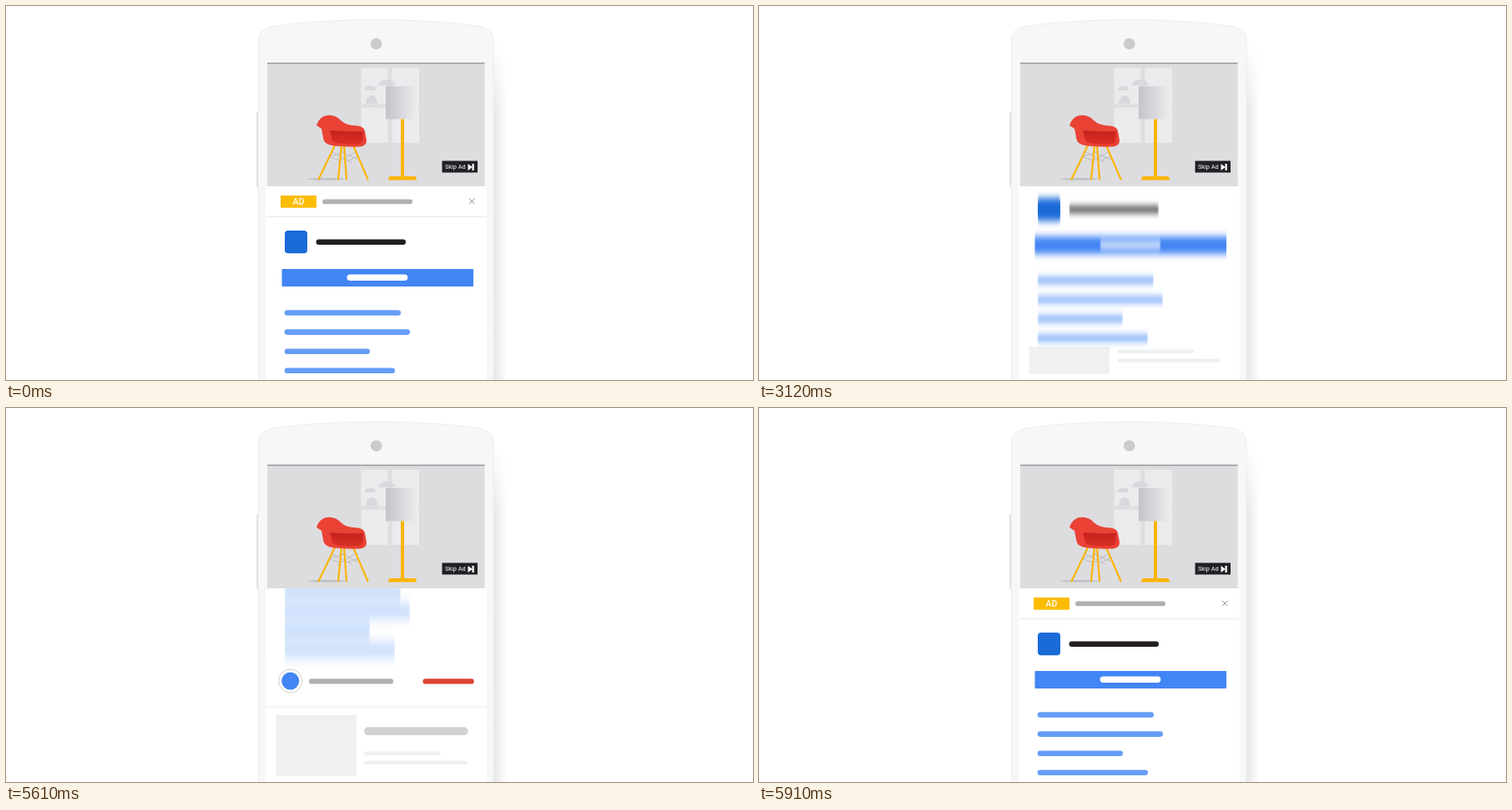
Recreate the animation shown at these times as an HTML page. Size 895 by 448 pixels, loop 6.3 s.

```html
<!DOCTYPE html>
<html lang="en">
<head>
<meta charset="utf-8">
<title>Phone ad panel</title>
<style>
  html, body { margin: 0; width: 100%; height: 100%; overflow: hidden; background: #fff; }
  svg { display: block; width: 100%; height: 100%; }
  text { font-family: Roboto, Arial, sans-serif; fill: #fff; }
  .line { fill: none; stroke-linecap: round; stroke-linejoin: round; }
</style>
</head>
<body>
<svg viewBox="0 0 895 448">
  <defs>
    <linearGradient id="side"><stop stop-color="#e3e4e4"/><stop offset=".5" stop-color="#f1f1f1"/><stop offset="1" stop-color="#fff"/></linearGradient>
    <linearGradient id="sideFade" x2="0" y2="1"><stop stop-color="#fff" stop-opacity="0"/><stop offset=".2" stop-color="#fff"/></linearGradient>
    <mask id="sideMask"><rect x="580" y="44" width="24" height="404" fill="url(#sideFade)"/></mask>
    <linearGradient id="shade"><stop stop-color="#c3c4c9"/><stop offset="1" stop-color="#eeeef0"/></linearGradient>
    <linearGradient id="seat" x2="0" y2="1"><stop stop-color="#c5221f"/><stop offset="1" stop-color="#da3025"/></linearGradient>
    <clipPath id="below"><rect x="311" y="216" width="265" height="232"/></clipPath>
    <filter id="smear" filterUnits="userSpaceOnUse" x="311" y="180" width="265" height="300" color-interpolation-filters="sRGB">
      <feGaussianBlur id="blur" stdDeviation="0 0"/>
    </filter>
  </defs>

  <!-- phone -->
  <rect x="582" y="44" width="18" height="404" fill="url(#side)" mask="url(#sideMask)"/>
  <rect x="300" y="127" width="4" height="90" rx="1" fill="#e3e5e5"/>
  <path d="M302.5 450V40Q303 28 319 24.500Q372 16.500 443.500 16.500T568 24.500Q583.500 28 584 40V450Z" fill="#f6f8f8" stroke="#eceeee"/>
  <circle cx="443.700" cy="45.300" r="6.800" fill="#c9cbcc"/>
  <rect x="311.500" y="216" width="264.500" height="232" fill="#fff"/>

  <!-- video -->
  <rect x="313" y="68" width="260.500" height="148" fill="#dddde0"/>
  <rect x="313" y="67.800" width="260.500" height="1.500" fill="#96979a"/>
  <rect x="425.500" y="74" width="69.500" height="90" fill="#ebebed"/>
  <path d="M457.500 74h5v90h-5zM425.500 117.500h69.500v4h-69.500z" fill="#dedee1"/>
  <path d="M430 101a5 5 0 0 1 7-5q6-1 6 5zM446 95a11 10 0 0 1 21 0zM431 117a7 10 0 0 1 14 0z" fill="#d9d9dd"/>
  <rect x="455" y="96" width="39" height="39.500" fill="url(#shade)"/>
  <path d="M473 135.500h4v68.500h12q3 0 3 4.500h-34q0-4.500 3-4.500h12z" fill="#fbb505"/>
  <ellipse cx="384" cy="207.300" rx="23" ry="1.200" fill="#bdbec2"/>
  <path class="line" d="M391 175L414 187M389 180L407 174M398 187L418 175M401 174L421 184M388 181L400 185M410 185L421 180" stroke="#bbbcc1"/>
  <path class="line" d="M394 167L374.500 207.500M402 167L398 207.500M405 167L408 207.500M416 167L433.500 207.500" stroke="#fbb505" stroke-width="2.200"/>
  <path d="M372 143Q376 131 387 130.800Q396 131 401 137Q407 143 421 143.500Q429 144.500 430 150L432 161Q432 168 424 168.500Q406 169 393 167.500Q382 166 380.500 160L378 147Z" fill="#ea4335"/>
  <path d="M388 149Q407 151 428 150L427.500 160Q427 165 421 165.500Q407 166 397 164.500Q391 163 390.500 159Z" fill="url(#seat)"/>
  <rect x="522.500" y="185.500" width="42.500" height="14" fill="#202124"/>
  <text x="526" y="195.200" font-size="7.300">Skip Ad</text>
  <path d="M553.500 189l5 3.800v-3.800h2.200v8h-2.200v-3.800l-5 3.800z" fill="#fff"/>

  <!-- collapsed ad and page below it -->
  <g id="page"></g>
  <path id="chevrons" class="line" d="M-3 -2.400L0 -5.200L3 -2.400M-3 2.400L0 5.200L3 2.400"/>

  <!-- expanded ad, slides up under the video -->
  <g clip-path="url(#below)">
    <g id="sheet">
      <rect x="311.500" y="214" width="264.500" height="233" fill="#fff"/>
    </g>
    <g id="smeared">
      <g id="content">
        <path id="cross" class="line" d="M-3 -3L3 3M3 -3L-3 3"/>
      </g>
    </g>
  </g>
</svg>
<script>
const LOOP = 6300, STEP = 30, TRAVEL = 232;
const $ = id => document.getElementById(id);
const BLUE = '#4285f4', GREY = '#b1b1b1', YELLOW = '#fbbc04', ICON = '#1a6ad8';

function add(parent, tag, attrs, text = '') {
  const node = document.createElementNS('http://www.w3.org/2000/svg', tag);
  for (const key in attrs) node.setAttribute(key, attrs[key]);
  node.textContent = text;
  parent.append(node);
}
const box = (parent, x, y, right, bottom, fill, rx = 0) =>
  add(parent, 'rect', { x, y, width: right - x, height: bottom - y, rx, fill });
const bar = (parent, x, y, right, bottom, fill) =>
  box(parent, x, y, right, bottom, fill, (bottom - y) / 2);
const divider = (parent, y) => box(parent, 312, y, 575.5, y + 1, '#e8e9e9');

function badge(parent, x, y, right, bottom, size) {
  box(parent, x, y, right, bottom, YELLOW);
  add(parent, 'text', {
    x: (x + right) / 2, y: (y + bottom) / 2 + size * 0.36,
    'font-size': size, 'font-weight': 500, 'text-anchor': 'middle'
  }, 'AD');
}

function buildPage(g) {
  box(g, 328, 226, 354, 252, ICON, 4);
  bar(g, 364, 229.3, 457.5, 235.3, GREY);
  badge(g, 364, 240.3, 390, 249.5, 6.5);
  bar(g, 393, 243.2, 447, 247.2, GREY);
  box(g, 488.3, 232.3, 541, 245, BLUE, 1);
  bar(g, 503, 236.8, 526.3, 240.4, '#fff');
  divider(g, 259);
  bar(g, 327, 272.5, 499.5, 282.5, '#202022');
  add(g, 'path', { d: 'M548.5 275H561L554.700 280.300Z', fill: '#a9a9a9' });
  bar(g, 330.3, 289.8, 430.5, 296.2, GREY);
  add(g, 'circle', { cx: 340.7, cy: 327, r: 14, fill: '#fff', stroke: '#cfcfcf' });
  add(g, 'circle', { cx: 340.7, cy: 327, r: 10.5, fill: BLUE });
  bar(g, 363, 324.2, 464, 330.6, GREY);
  bar(g, 499.5, 324.2, 560.7, 330.6, '#db4437');
  divider(g, 357.5);
  box(g, 323.5, 368, 420, 440.5, '#f0f0f0');
  bar(g, 429, 382.2, 553.7, 392, '#d1d2d2');
  bar(g, 429, 411.4, 521, 416, '#eef1f2');
  bar(g, 429, 422.4, 552.5, 427, '#eef1f2');
}

function buildContent(g) {
  badge(g, 329, 227, 372, 241.7, 10.5);
  bar(g, 379, 231.4, 487, 237.2, GREY);
  divider(g, 252);
  box(g, 334, 269, 361, 296.3, ICON, 4);
  bar(g, 371.5, 279.5, 479, 286, '#231f20');
  box(g, 330.5, 315, 560, 336, BLUE, 1);
  bar(g, 408.5, 321.5, 481.3, 329, '#fff');
  [473, 484, 436, 466].forEach((right, i) =>
    bar(g, 333.7, 364.2 + i * 23.1, right, 370.8 + i * 23.1, '#669df6'));
}

// The icon darkens at once, swells and shrinks back.
function pulse(icon, x, y, t, start) {
  const p = (t - start) / 600;
  const active = p >= 0 && p < 1;
  const scale = active ? 1 + 0.85 * Math.sin(Math.PI * p) : 1;
  icon.setAttribute('transform', `translate(${x} ${y}) scale(${scale})`);
  icon.setAttribute('stroke', active ? '#202124' : '#8f8f8f');
}

function slide(t) {
  if (t < 2970 || t >= 5910) return 0;
  if (t < 3210) return TRAVEL * ((t - 2970) / 240) ** 3.8;
  if (t < 5550) return TRAVEL;
  return TRAVEL * ((5910 - t) / 360) ** 2.5;
}

function draw(t) {
  const shift = slide(t);
  const move = `translate(0 ${-shift})`;
  $('sheet').setAttribute('transform', move);
  $('content').setAttribute('transform', move);
  $('blur').setAttribute('stdDeviation', `0 ${0.7 * Math.sqrt(shift)}`);
  if (shift) $('smeared').setAttribute('filter', 'url(#smear)');
  else $('smeared').removeAttribute('filter');
  pulse($('cross'), 558.2, 234, t, 2280);
  pulse($('chevrons'), 558.4, 237.8, t, 4830);
}

buildPage($('page'));
buildContent($('content'));
const begin = performance.now();
function tick() {
  const t = (performance.now() - begin) % LOOP;
  draw(Math.floor(t / STEP) * STEP);
  requestAnimationFrame(tick);
}
tick();
</script>
</body>
</html>
```
